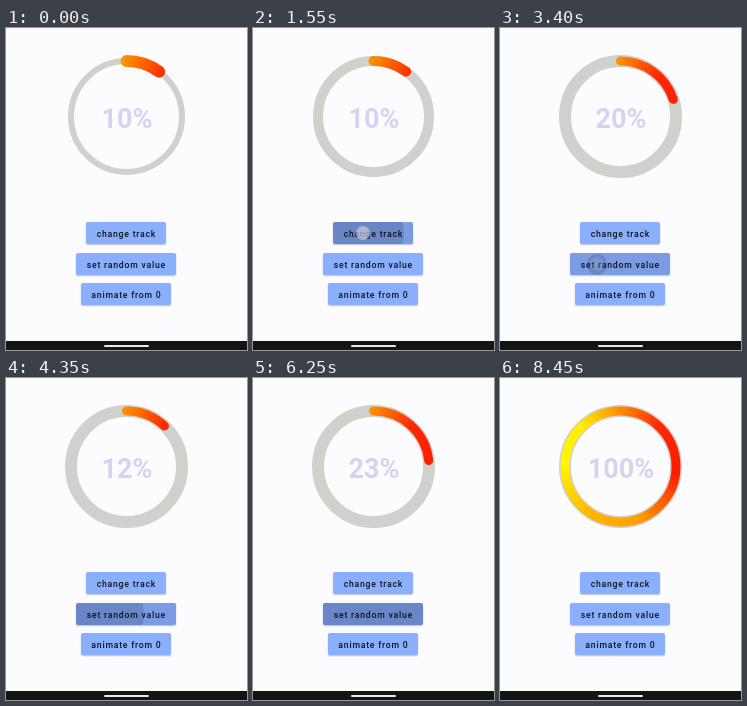
Write an HTML page with a canvas that moves like this. It is 241 px wide and 322 px high and loops after 8500 ms.

```html
<!DOCTYPE html>
<html lang="en">
<head>
<meta charset="utf-8">
<title>Circular progress</title>
<style>
html, body { margin: 0; width: 100%; height: 100%; overflow: hidden; background: #fcfcff; }
#stage { position: absolute; left: 0; top: 0; width: 241px; height: 322px; overflow: hidden; background: #fcfcff; font-family: Roboto, sans-serif; }
canvas { position: absolute; left: 0; top: 0; width: 241px; height: 180px; }
#label { position: absolute; left: 0; top: 75px; width: 242px; text-align: center; font-size: 27px; line-height: 32px; font-weight: 700; color: #d5d3f0; }
.btn { position: absolute; height: 22px; border-radius: 2px; background: #8aaffd; box-shadow: 0 1px 1.5px rgba(60, 65, 110, .32); color: #10131c; font-size: 8.7px; font-weight: 500; letter-spacing: .77px; line-height: 24px; text-align: center; text-indent: .77px; white-space: nowrap; }
.shade { position: absolute; inset: 0; border-radius: 2px; overflow: hidden; background: rgba(38, 52, 79, .15); opacity: 0; }
.ripple { position: absolute; border-radius: 50%; background: rgba(38, 52, 79, .2); }
.btn span { position: relative; }
#touch { position: absolute; width: 14px; height: 14px; margin: -7px; border-radius: 50%; background: #c3c9d8; opacity: 0; }
#nav { position: absolute; left: 0; top: 313px; width: 241px; height: 9px; background: #141510; }
#nav i { position: absolute; left: 98px; top: 3.5px; width: 45px; height: 2px; border-radius: 1px; background: #e8e8e8; }
</style>
</head>
<body>
<div id="stage">
  <canvas id="ring"></canvas>
  <div id="label">10%</div>
  <div id="buttons"></div>
  <div id="touch"></div>
  <div id="nav"><i></i></div>
</div>
<script>
const LOOP = 8500, CX = 120.5, CY = 88.5, R = 55.5, DELAY = 130;
const $ = id => document.getElementById(id);
const clamp = x => Math.max(0, Math.min(1, x));
const ease = x => .5 - .5 * Math.cos(Math.PI * clamp(x));
const mix = (a, b, k) => a + (b - a) * k;

// Each button is tapped `count` times, `every` ms apart.
const buttons = [
  { text: "change track", width: 80, first: 650, every: 400, count: 3, hold: 150, x: 110, glow: .7 },
  { text: "set random value", width: 100, first: 2450, every: 900, count: 5, hold: 90, x: 97, glow: .2 },
  { text: "animate from 0", width: 90, first: 6550, every: 900, count: 1, hold: 90, x: 105, glow: .2 }
];
const [trackButton, randomButton, sweepButton] = buttons;
const randomValues = [10, 20, 12, 44, 23, 36];

buttons.forEach((b, i) => {
  b.left = 120 - b.width / 2;
  b.top = 194 + 30.7 * i;
  const el = document.createElement("div");
  el.className = "btn";
  el.style.cssText = `left:${b.left}px;top:${b.top}px;width:${b.width}px`;
  el.innerHTML = `<div class="shade"><div class="ripple"></div></div><span>${b.text}</span>`;
  $("buttons").append(el);
  b.shade = el.firstElementChild;
  b.ripple = b.shade.firstElementChild;
});

const canvas = $("ring"), ctx = canvas.getContext("2d");
const scale = window.devicePixelRatio || 1;
canvas.width = 241 * scale;
canvas.height = 180 * scale;
ctx.scale(scale, scale);
ctx.lineCap = "round";

const sweep = ctx.createConicGradient(-Math.PI / 2, CX, CY);
Object.entries({
  0: "#ff8a00", .12: "#ff2800", .27: "#ff1c00", .45: "#ffa000",
  .6: "#ffb800", .76: "#fff600", .88: "#ffee00", 1: "#ff8a00"
}).forEach(([at, color]) => sweep.addColorStop(+at, color));

const tapIndex = (b, t) => Math.min(b.count - 1, Math.floor((t - b.first) / b.every));

function valueAt(t) {
  const run = t - sweepButton.first - DELAY;
  if (run >= 0) return 100 * ease(run / 1100);
  const tap = tapIndex(randomButton, t - DELAY);
  if (tap < 0) return randomValues[0];
  const age = t - DELAY - randomButton.first - tap * randomButton.every;
  return mix(randomValues[tap], randomValues[tap + 1], ease(age / 750));
}

function arc(part, width, color) {
  ctx.beginPath();
  ctx.arc(CX, CY, R, -Math.PI / 2, (part * 2 - .5) * Math.PI);
  ctx.lineWidth = width;
  ctx.strokeStyle = color;
  ctx.stroke();
}

function drawRing(t) {
  const value = valueAt(t);
  const changes = Math.max(0, tapIndex(trackButton, t - trackButton.hold) + 1);
  ctx.clearRect(0, 0, 241, 180);
  arc(1, 6 + 2 * changes, "#d0d0cd");
  if (value > 0) arc(value / 100, 12 - changes, sweep);
  $("label").textContent = Math.round(value) + "%";
}

function drawTaps(t) {
  $("touch").style.opacity = 0;
  for (const b of buttons) {
    const tap = tapIndex(b, t);
    const age = t - b.first - tap * b.every;
    const active = tap >= 0 && age < 400;
    b.shade.style.opacity = active ? clamp(age / 40) * (1 - clamp((age - 200) / 200)) : 0;
    if (!active) continue;

    const radius = Math.min(110, age * age / 250);
    Object.assign(b.ripple.style, {
      left: b.x - b.left - radius + "px",
      top: 12 - radius + "px",
      width: 2 * radius + "px",
      height: 2 * radius + "px"
    });
    if (age < b.hold) {
      Object.assign($("touch").style, { left: b.x + "px", top: b.top + 11 + "px", opacity: b.glow });
    }
  }
}

function frame() {
  const t = performance.now() % LOOP;
  drawRing(t);
  drawTaps(t);
  requestAnimationFrame(frame);
}
frame();
</script>
</body>
</html>
```
